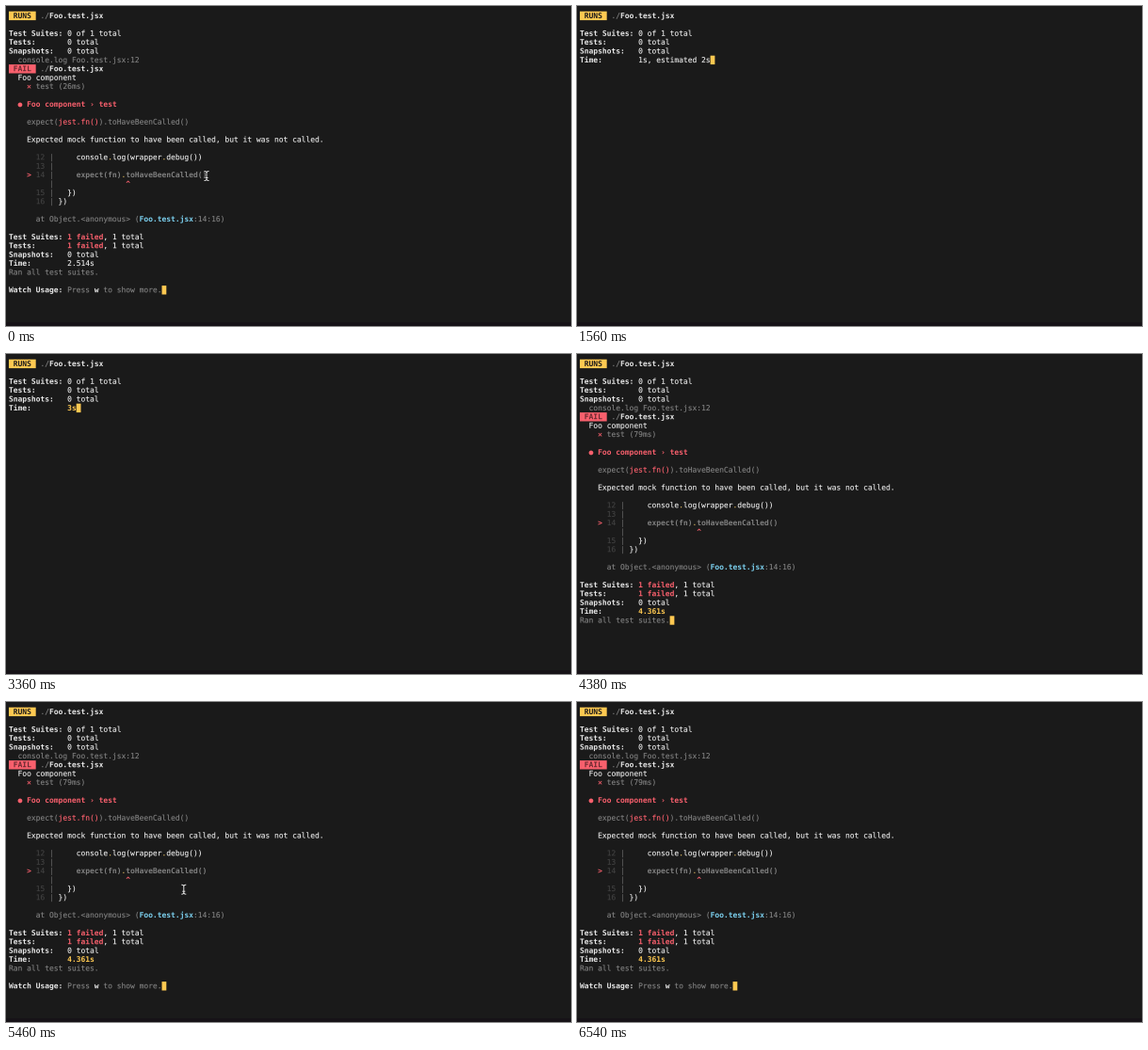
Animation, 600 px wide and 340 px high, one loop 6960 ms. Source, as an HTML page with a canvas:

```html
<!DOCTYPE html>
<html lang="en">
<head>
<meta charset="utf-8">
<title>Test watcher</title>
<style>
html, body { margin: 0; width: 100%; height: 100%; overflow: hidden; background: #1a1a1a; }
canvas { display: block; }
</style>
</head>
<body>
<canvas id="stage" width="600" height="340"></canvas>
<script>
// The screen is drawn enlarged and scaled down, so text keeps fractional positions.
const ZOOM = 4;
const stage = document.getElementById('stage').getContext('2d');
stage.imageSmoothingQuality = 'high';
const buffer = document.createElement('canvas');
buffer.width = 600 * ZOOM;
buffer.height = 340 * ZOOM;
const ctx = buffer.getContext('2d');
ctx.scale(ZOOM, ZOOM);

const LOOP = 6960, STEP = 60;
const LEFT = 3, TOP = 5.7, CELL_W = 4.78, CELL_H = 9.4, BASELINE = 7.2;
const BG = '#1a1a1a', YELLOW = '#ffc951', RED = '#f9606d';

// Style codes: [colour, bold, badge background]
const STYLES = {
  n: ['#e6e6e6'],
  b: ['#e8e8e8', true],
  d: ['#7f7f7f'],
  D: ['#808080', true],
  g: ['#414141'],
  p: ['#626262'],
  r: [RED],
  R: [RED, true],
  y: ['#d8b45c'],
  Y: [YELLOW, true],
  c: ['#7dd3f2', true],
  u: ['#1a1a1a', true, YELLOW],
  f: ['#6b2a31', true, RED]
};

const RUNS = '§u RUNS §d ./§bFoo.test.jsx';
const PENDING = [
  '§bTest Suites:§n 0 of 1 total',
  '§bTests:      §n 0 total',
  '§bSnapshots:  §n 0 total'
];
const gutter = number => `      §g${number}§p |§n`;

function report(duration) {
  return [
    RUNS, '', ...PENDING,
    '§d  console.log Foo.test.jsx:12',
    '§f FAIL §d ./§bFoo.test.jsx',
    '  Foo component',
    `    §r✕§d test (${duration})`,
    '',
    '  §R● Foo component › test',
    '',
    '    §dexpect(§rjest.fn()§d).toHaveBeenCalled()',
    '',
    '    Expected mock function to have been called, but it was not called.',
    '',
    gutter(12) + '     console§y.§nlog(wrapper§y.§ndebug())',
    gutter(13),
    '    §R>§g 14§p |     §Dexpect(fn)§y.§DtoHaveBeenCalled()',
    '         §p|                §R^',
    gutter(15) + '   })',
    gutter(16) + ' })',
    '',
    '      §dat Object.<anonymous> (§cFoo.test.jsx§d:14:16)',
    ''
  ];
}

const timer = text => `§bTime:        ${text}`;
const running = text => [RUNS, '', ...PENDING, timer(text)];
const summary = time => [
  '§bTest Suites: §R1 failed§n, 1 total',
  '§bTests:       §R1 failed§n, 1 total',
  '§bSnapshots:  §n 0 total',
  timer(time),
  '§dRan all test suites.'
];
const USAGE = ['', '§bWatch Usage:§d Press §bw§d to show more.'];

function screenAt(t) {
  if (t < 540) return [...report('26ms'), ...summary('§n2.514s'), ...USAGE];
  if (t < 600) return ['', ''];
  if (t < 720) return ['', ...PENDING, timer('§n0s, estimated 2s')];
  if (t < 1560) return running('§n0s, estimated 2s');
  if (t < 2460) return running('§n1s, estimated 2s');
  if (t < 3360) return running('§Y2s');
  if (t < 4260) return running('§Y3s');
  const lines = report('79ms');
  if (t >= 4380) lines.push(...summary('§Y4.361s'));
  if (t >= 4500) lines.push(...USAGE);
  return lines;
}

function fillCells(color, col, row, count) {
  ctx.fillStyle = color;
  ctx.fillRect(LEFT + col * CELL_W, TOP + row * CELL_H, count * CELL_W, CELL_H);
}

// Draws one styled line cell by cell and returns its length in columns.
function drawLine(line, row) {
  const y = TOP + row * CELL_H + BASELINE;
  let col = 0;
  line.split('§').forEach((part, i) => {
    const [color, bold, badge] = STYLES[i ? part[0] : 'n'];
    const text = i ? part.slice(1) : part;
    if (badge) fillCells(badge, col, row, text.length);
    ctx.fillStyle = ctx.strokeStyle = color;
    ctx.lineWidth = 0.15;
    ctx.font = `${bold ? 'bold ' : ''}7.94px "DejaVu Sans Mono", monospace`;
    for (const char of text) {
      const x = LEFT + col++ * CELL_W;
      if (char === ' ') continue;
      ctx.fillText(char, x, y);
      if (!bold) ctx.strokeText(char, x, y);
    }
  });
  return col;
}

// Pointer waypoints: [time, x, y]
const SWIPE = [[5340, 208, 184], [5640, 160, 222], [5940, 122, 262], [6060, 128, 275], [6540, 194, 350]];

function pointerAt(t) {
  if (t < 540) return [213, 180.5];
  const i = SWIPE.findIndex(([time], n) => n && t >= SWIPE[n - 1][0] && t < time);
  if (i < 0) return null;
  const [t0, x0, y0] = SWIPE[i - 1], [t1, x1, y1] = SWIPE[i];
  const k = (t - t0) / (t1 - t0);
  return [x0 + (x1 - x0) * k, y0 + (y1 - y0) * k];
}

function drawPointer([x, y]) {
  const beam = new Path2D(`M${x - 2.5} ${y - 5}Q${x} ${y - 5} ${x} ${y - 3}V${y + 3}
    Q${x} ${y + 5} ${x - 2.5} ${y + 5}M${x + 2.5} ${y - 5}Q${x} ${y - 5} ${x} ${y - 3}
    M${x} ${y + 3}Q${x} ${y + 5} ${x + 2.5} ${y + 5}M${x - 1.5} ${y + 2}H${x + 1.5}`);
  ctx.strokeStyle = '#111';
  ctx.lineWidth = 2.2;
  ctx.stroke(beam);
  ctx.strokeStyle = '#e4e4e4';
  ctx.lineWidth = 1;
  ctx.stroke(beam);
}

function draw(now) {
  const t = Math.floor((now % LOOP) / STEP) * STEP;
  ctx.fillStyle = BG;
  ctx.fillRect(0, 0, 600, 340);
  ctx.fillStyle = '#161217';
  ctx.fillRect(0, 336, 600, 4);

  const lines = screenAt(t);
  let col = 0;
  lines.forEach((line, row) => { col = drawLine(line, row); });
  fillCells(YELLOW, col, lines.length - 1, 1);

  const pointer = pointerAt(t);
  if (pointer) drawPointer(pointer);
  stage.drawImage(buffer, 0, 0, 600, 340);
}

const start = performance.now();
function tick() {
  draw(performance.now() - start);
  requestAnimationFrame(tick);
}
tick();
</script>
</body>
</html>
```
